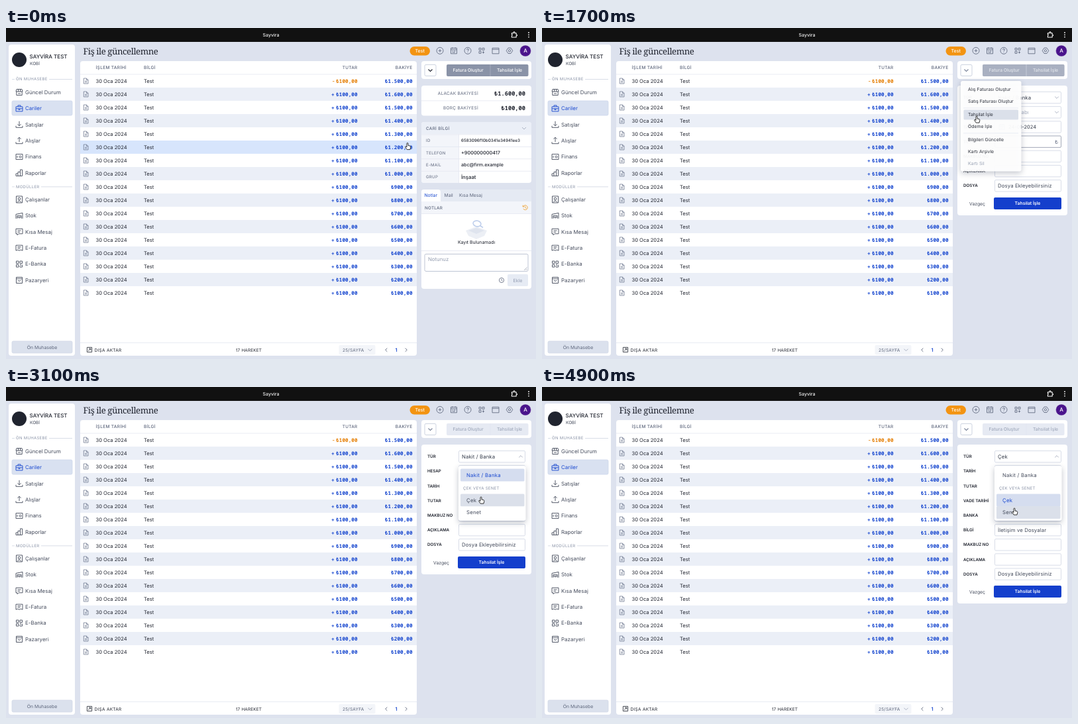
Recreate the animation shown at these times as an HTML page with a canvas. Size 800 by 500 pixels, loop 5000 ms.

```html
<!DOCTYPE html>
<html lang="tr">
<head>
<meta charset="utf-8">
<title>Sayvira</title>
<style>
html, body { margin: 0; width: 100%; height: 100%; overflow: hidden; background: #dde2ee; }
canvas { display: block; width: 800px; height: 500px; }
</style>
</head>
<body>
<canvas id="stage"></canvas>
<script>
const canvas = document.getElementById('stage');
const c = canvas.getContext('2d');
const dpr = window.devicePixelRatio || 1;
canvas.width = 800 * dpr;
canvas.height = 500 * dpr;

const LOOP = 5000, STEP = 100;
const SANS = 'Inter, "Open Sans", sans-serif';
const MONO = '"Noto Sans Mono", "DejaVu Sans Mono", monospace';
const SERIF = '"Noto Serif", serif';
const INK = '#20242f', TEXT = '#434a5b', MUTED = '#a3abbd', BLUE = '#1747cf';
const LINE = '#e3e7f0', PALE = '#ebeff7', TINT = '#f3f5fa', BORDER = '#cfd5e2', SLATE = '#5d667c';

const ICONS = {
  store: 'M-4-4.5H4L5-1H-5ZM-4.2-1V4.5H4.2V-1M-1.5-4.5V-1M1.5-4.5V-1M-2 2H2',
  brief: 'M-5-2.5H5V4.5H-5ZM-2-2.5V-4.5H2V-2.5M-5 .5H5M-1 .5V2H1V.5',
  down: 'M0-5V2M-2.5-.5L0 2L2.5-.5M-5 2V4.5H5V2',
  up: 'M0 2V-5M-2.5-2.5L0-5L2.5-2.5M-5 2V4.5H5V2',
  safe: 'M-5-4H5V4H-5ZM3 0A1.5 1.5 0 1 1 0 0A1.5 1.5 0 1 1 3 0M-3-1.5V1.5',
  bars: 'M-5 4.5V1H-2V4.5M-2 1V-1.5H1.5V4.5M1.5-1.5V-5H4.5V4.5H-5',
  person: 'M-4.5-5H4.5V5H-4.5ZM1.8-1A1.8 1.8 0 1 1-1.8-1A1.8 1.8 0 1 1 1.8-1M-3 4.5Q0-.5 3 4.5',
  shed: 'M-5 4.5V-2L5-4V4.5M-3 4.5V0H3V4.5M-3 2.2H3M0 2.2V4.5',
  chat: 'M-5-4.5H5V3H-1L-3 5V3H-5ZM-2.5-1.8H2.5M-2.5.5H1',
  bill: 'M-5-4H5V4L2.5 3L0 4L-2.5 3L-5 4ZM-2.5-1.5H2.5M-2.5.7H1.5',
  tiles: 'M-4.5-4.5H-1V-1H-4.5ZM1-4.5H4.5V-1H1ZM-4.5 1H-1V4.5H-4.5ZM1 1H2.5V2.5M4.5 1V4.5H1V3',
  market: 'M-4.5-4.5H4.5V4.5H-4.5ZM-4.5-2.2H4.5M-2.2 0Q0 3 2.2 0',
  doc: 'M-3.2-4H1L3.5-1.5V4H-3.2ZM1-4V-1.5H3.5M-1.5.3H1.8M-1.5 2H1.8',
  plus: 'M5 0A5 5 0 1 1-5 0A5 5 0 1 1 5 0M-2.3 0H2.3M0-2.3V2.3',
  date: 'M-4.5-4H4.5V4.5H-4.5ZM-4.5-1.5H4.5M-2.2-5V-3M2.2-5V-3M-2.5.5H-1M0 .5H2.5M-2.5 2.5H2',
  help: 'M5 0A5 5 0 1 1-5 0A5 5 0 1 1 5 0M-1.5-1.2Q-1.3-2.8 0-2.8Q1.6-2.7 1.5-1.3Q1.3-.4 0 .3V1M0 2.3V3',
  apps: 'M-4-4H-1V-1H-4ZM1-4H4V-1H1ZM-4 1H-1V4H-4ZM2.5 .8V4.2M.8 2.5H4.2',
  win: 'M-5-4H5V4.5H-5ZM-5-2H5',
  gear: 'M-2-4.2H2L4.8 0L2 4.2H-2L-4.8 0ZM1.7 0A1.7 1.7 0 1 1-1.7 0A1.7 1.7 0 1 1 1.7 0',
  puzzle: 'M-4-2.5H-1Q-1.5-4.6 0-4.6Q1.5-4.6 1-2.5H3.5V0Q5-.2 5 1Q5 2.2 3.5 2V4.5H-4V2.2Q-2-.2-4-.2Z',
  share: 'M-4-4H4V4H-4ZM-2 2L2-2M-1-2H2V1',
  clock: 'M4 0A4 4 0 1 1-4 0A4 4 0 1 1 4 0M0-2.3V0L1.6 1',
  back: 'M-3.5-1.5A3.6 3.6 0 1 1-3.4 1.6M-4-3.8V-1.3H-1.5M0-1.8V.3L1.5 1.2'
};
const CURSORS = {
  hand: 'M-1 .8Q-1-.5 0-.5Q1-.5 1 .8V3.5L4 4.2Q5 4.6 4.8 6L4 9.6H-.8L-3.4 5.8Q-3.3 4.4-2 5.1L-1 6Z',
  arrow: 'M0 0V9L2.1 7.1L3.6 10.3L5 9.6L3.6 6.5H6.4Z',
  beam: 'M-1.8-4.5Q0-4.5 0-3.5Q0-4.5 1.8-4.5M0-3.5V3.5M-1.8 4.5Q0 4.5 0 3.5Q0 4.5 1.8 4.5'
};

function ramp(t, a, b) { return Math.max(0, Math.min(1, (t - a) / (b - a))); }

function text(s, x, y, size, color = TEXT, o = {}) {
  c.font = `${o.w || 400} ${size}px ${o.f || SANS}`;
  c.letterSpacing = (o.ls || 0) + 'px';
  c.textRendering = 'geometricPrecision';
  c.textAlign = o.a || 'left';
  c.fillStyle = color;
  c.fillText(s, x, y + size * 0.364);
}

function box(x, y, w, h, r, fill, stroke) {
  c.beginPath();
  c.roundRect(x, y, w, h, r);
  if (fill) { c.fillStyle = fill; c.fill(); }
  if (stroke) { c.strokeStyle = stroke; c.lineWidth = 0.8; c.stroke(); }
}

function rect(x, y, w, h, fill) { c.fillStyle = fill; c.fillRect(x, y, w, h); }

function dot(x, y, r, fill) {
  c.beginPath();
  c.arc(x, y, r, 0, 7);
  c.fillStyle = fill;
  c.fill();
}

function at(x, y, paint) { c.save(); c.translate(x, y); paint(); c.restore(); }

function icon(name, x, y, color = SLATE, scale = 1, lw = 0.9) {
  at(x, y, () => {
    c.scale(scale, scale);
    c.strokeStyle = color;
    c.lineWidth = lw;
    c.stroke(new Path2D(ICONS[name]));
  });
}

// turn: 1 points down, -1 up
function chevron(x, y, color, turn = 1, size = 3, lw = 0.9) {
  c.beginPath();
  c.moveTo(x - size, y - size * turn / 2);
  c.lineTo(x, y + size * turn / 2);
  c.lineTo(x + size, y - size * turn / 2);
  c.strokeStyle = color;
  c.lineWidth = lw;
  c.stroke();
}

function fade(alpha, paint) {
  if (alpha <= 0) return;
  c.save();
  c.globalAlpha *= alpha;
  paint();
  c.restore();
}

function popup(x, y, w, h) {
  c.save();
  c.shadowColor = 'rgba(30,40,70,.28)';
  c.shadowBlur = 9 * dpr;
  c.shadowOffsetY = 3 * dpr;
  box(x, y, w, h, 3, '#fff');
  c.restore();
}

function money(n) {
  const s = n < 1000 ? n : Math.floor(n / 1000) + '.' + String(n % 1000).padStart(3, '0');
  return '₺' + s + ',00';
}

const PATH = [
  [0, 606, 174], [100, 606, 174], [450, 643, 62], [700, 643, 62], [1150, 656, 133.5],
  [1750, 656, 133.5], [2150, 732, 107.5], [2600, 732, 107.5], [3050, 717, 166.5],
  [3850, 717, 166.5], [4250, 729, 107.5], [4500, 729, 107.5], [4850, 713, 183.5], [5000, 713, 183.5]
];

function pointer(t) {
  const i = PATH.findIndex((k, n) => n && t <= k[0]);
  const [t0, x0, y0] = PATH[i - 1], [t1, x1, y1] = PATH[i];
  const u = ramp(t, t0, t1), e = u * u * (3 - 2 * u);
  const x = x0 + (x1 - x0) * e, y = y0 + (y1 - y0) * e;
  let kind = 'hand';
  if (t < 600 && x >= 620 && y > 75 || t > 700 && t < 1150 && y > 74 && y < 83) kind = 'arrow';
  if (t > 1850 && t < 2100) kind = 'arrow';
  if (t >= 3300 && t < 4300 && y > 116) kind = 'beam';
  return { x, y, kind };
}

function topBar() {
  rect(0, 0, 800, 21, '#111');
  text('Sayvira', 400, 10.5, 7, '#f4f4f4', { w: 500, a: 'center' });
  icon('puzzle', 767, 10, '#fff', 0.9, 1.2);
  for (const y of [7, 10.3, 13.6]) dot(789, y, 0.9, '#fff');
}

function heading(s, y, x) {
  rect(9, y, 4, 0.8, BORDER);
  rect(x, y, 100 - x, 0.8, BORDER);
  text(s, 15, y, 6, '#8b94a8', { ls: 0.3 });
}

function sidebar() {
  box(4, 25, 100, 470, 4, '#fff');
  dot(20, 48, 11, '#20242f');
  text('SAYVİRA TEST', 35.5, 43.5, 8, INK, { w: 500 });
  text('KOBİ', 36, 53.5, 6.5, TEXT);
  heading('ÖN MUHASEBE', 77, 65);
  heading('MODÜLLER', 239.5, 53);
  box(9, 110, 91, 22, 2, '#d9e1f1', '#cdd7eb');
  const groups = [
    [97, 'store', 'Güncel Durum', 'brief', 'Cariler', 'down', 'Satışlar', 'up', 'Alışlar', 'safe', 'Finans', 'bars', 'Raporlar'],
    [259, 'person', 'Çalışanlar', 'shed', 'Stok', 'chat', 'Kısa Mesaj', 'bill', 'E-Fatura', 'tiles', 'E-Banka', 'market', 'Pazaryeri']
  ];
  for (const [y0, ...items] of groups) {
    for (let i = 0; i < 6; i++) {
      const y = y0 + i * 24.4, label = items[2 * i + 1];
      const color = label === 'Cariler' ? BLUE : TEXT;
      icon(items[2 * i], 20, y, color);
      text(label, 29, y, 7.9, color, { ls: 0.05 });
    }
  }
  box(9, 473, 91, 18, 2, '#dbe1ed', '#d2d9e7');
  text('Ön Muhasebe', 54.5, 482, 6.9, SLATE, { a: 'center' });
}

function header() {
  text('Fiş ile güncellemne', 116.5, 34.8, 13.2, INK, { f: SERIF, ls: -0.42 });
  box(609.5, 28, 30.5, 13.5, 6.8, '#f39412');
  text('Test', 624.7, 34.7, 7, '#fff', { w: 500, a: 'center' });
  ['plus', 'date', 'help', 'apps', 'win', 'gear'].forEach((n, i) => icon(n, 655 + i * 21, 34.3, SLATE, 1, 0.85));
  dot(784, 34.5, 8.6, '#a58fc4');
  dot(784, 34.5, 8, '#4a148c');
  text('A', 784, 34.5, 8, '#fff', { w: 500, a: 'center' });
}

function table(hover) {
  box(112, 50, 508, 445, 4, '#fff');
  const cap = { ls: 0.3, w: 500 }, right = { ls: 0.3, w: 500, a: 'right' };
  text('İŞLEM TARİHİ', 135.5, 60, 6.6, SLATE, cap);
  text('BİLGİ', 208, 60, 6.6, SLATE, cap);
  text('TUTAR', 530.5, 60, 6.4, SLATE, right);
  text('BAKİYE', 613.5, 60, 6.6, SLATE, right);
  rect(112, 69.6, 508, 0.8, LINE);
  const num = { f: MONO, w: 600, a: 'right' };
  for (let i = 0; i < 17; i++) {
    const y = 80 + i * 20, color = i ? BLUE : '#e57f06';
    if (i === hover) rect(112, y - 10, 508, 20, '#d7e5fc');
    else if (i % 2) rect(112, y - 10, 508, 20, PALE);
    icon('doc', 120.5, y, '#737c92', 1, 0.8);
    text('30 Oca 2024', 135.5, y, 7.6, INK);
    text('Test', 208, y, 7.6, INK);
    text(i ? '+' : '-', 496, y, 7.7, color, { w: 600, a: 'right' });
    text(money(100), 530.5, y, 7.7, color, num);
    text(money(i ? 1700 - i * 100 : 1500), 613.5, y, 7.7, BLUE, num);
  }
  rect(112, 475, 508, 0.8, LINE);
  icon('share', 126, 486, INK, 0.9);
  text('DIŞA AKTAR', 133.5, 486.3, 6.5, INK, { ls: 0.3 });
  text('17 HAREKET', 366.5, 486.3, 6.4, INK, { ls: 0.2, a: 'center' });
  box(502.5, 479, 55, 14.5, 2, '#f3f5f9');
  text('25/SAYFA', 508, 486.3, 6.6, SLATE, { ls: 0.2 });
  chevron(549.5, 486.3, MUTED);
  text('1', 589, 486.3, 7.4, BLUE, { w: 600, a: 'center' });
  for (const side of [-1, 1]) at(589 + side * 15, 486.3, () => {
    c.rotate(-side * Math.PI / 2);
    chevron(0, 0, SLATE, 1, 2.6);
  });
}

function actions(t) {
  const off = ramp(t, 1600, 1900);
  const turn = 1 - 2 * (ramp(t, 500, 700) - ramp(t, 1500, 1680));
  box(627, 50, 166, 27, 4, '#fff');
  box(632, 55.4, 17, 17, 2, '#fff', '#bfc7d8');
  chevron(640.5, 64, off ? '#7b859b' : INK, turn, 3, 1.1);
  const pair = (bg, fg, split) => {
    box(665, 55, 123.5, 18, 2, bg);
    rect(730.6, 55, 0.8, 18, split);
    text('Fatura Oluştur', 697.5, 64, 6.8, fg, { w: 500, a: 'center' });
    text('Tahsilat İşle', 760, 64, 6.8, fg, { w: 500, a: 'center' });
  };
  if (off < 1) pair('#8a93a7', '#fff', '#a8b0c0');
  fade(off, () => pair('#e6eaf3', '#9fa8bb', '#e1e6f0'));
}

function details() {
  box(627, 87, 166, 45.5, 4, '#fff');
  rect(627, 109.5, 166, 0.8, LINE);
  [['ALACAK BAKİYESİ', 1600, 98.5], ['BORÇ BAKİYESİ', 100, 121]].forEach(([s, n, y]) => {
    text(s, 713, y, 6.5, SLATE, { a: 'right', ls: 0.3 });
    text(money(n), 784, y, 8.7, INK, { f: MONO, w: 600, a: 'right' });
  });

  box(627, 142, 166, 92, 4, '#fff');
  box(627, 142, 166, 18.5, [4, 4, 0, 0], PALE);
  box(627, 160.5, 56, 73.5, [0, 0, 0, 4], TINT);
  text('CARİ BİLGİ', 634, 151.5, 6.4, SLATE, { ls: 0.3, w: 500 });
  chevron(782, 151.5, MUTED);
  rect(683, 160.5, 0.8, 73.5, LINE);
  const rows = [
    ['ID', '6583096f10b0341e34941ee3', 6.3], ['TELEFON', '+900000000417', 7.3],
    ['E-MAİL', 'abc@firm.example', 7.1], ['GRUP', 'İnşaat', 7.8]
  ];
  rows.forEach(([k, v, size], i) => {
    const y = 170 + i * 18.4;
    rect(627, y - 9.4, 166, 0.8, LINE);
    text(k, 634, y, 6.1, SLATE, { ls: 0.3 });
    text(v, 687, y, size, INK, { w: 500 });
  });

  box(627, 244, 166, 150, 4, '#fff');
  box(627, 244, 166, 18, [4, 4, 0, 0], '#e5eaf3');
  box(627, 244, 29, 18, [4, 4, 0, 0], '#fff');
  text('Notlar', 631.5, 253, 6.8, BLUE);
  text('Mail', 661.5, 253, 6.8, SLATE);
  text('Kısa Mesaj', 684, 253, 6.8, SLATE);
  rect(627, 262, 166, 18, TINT);
  rect(627, 280, 166, 0.8, LINE);
  text('NOTLAR', 632, 271.3, 6.3, SLATE, { ls: 0.25, w: 500 });
  icon('back', 784, 271.3, '#f0a53a', 0.95, 1);
  c.fillStyle = '#eceff5';
  c.fill(new Path2D('M694 306L710 300L726 306L722 314L710 319L698 314Z'));
  c.fillStyle = '#dfe4ee';
  c.fill(new Path2D('M698 306L710 302L722 306L710 311Z'));
  c.strokeStyle = '#bfcfec';
  c.lineWidth = 1.6;
  c.beginPath();
  c.ellipse(711, 295.5, 6, 4.3, 0.2, 0, 7);
  c.moveTo(715.5, 298.5);
  c.lineTo(720, 301.5);
  c.stroke();
  text('Kayıt Bulunamadı', 710, 323, 6.9, INK, { a: 'center' });
  rect(627, 336, 166, 0.8, LINE);
  box(632, 341.5, 156, 26, 2, '#fff', '#aeb7ca');
  text('Notunuz', 637, 349.5, 7.8, '#949db0');
  c.strokeStyle = '#7f889c';
  c.lineWidth = 0.6;
  c.stroke(new Path2D('M786.5 361.5L782 366M786.5 364L784.5 366'));
  icon('clock', 748, 381, SLATE, 0.9);
  box(757, 372, 31, 18, 2, '#e6ebf4');
  text('Ekle', 772.5, 381, 7, '#929bb0', { a: 'center' });
}

const FORMS = {
  cash: [
    ['TÜR', 'select', 'Nakit / Banka'], ['HESAP', 'select', 'Kasa Hesabı'], ['TARİH', 'date'], ['TUTAR', 'sum'],
    ['MAKBUZ NO'], ['AÇIKLAMA'], ['DOSYA', 'text', 'Dosya Ekleyebilirsiniz']
  ],
  cheque: [
    ['TÜR', 'select', 'Çek'], ['TARİH', 'date'], ['TUTAR', 'sum'], ['VADE TARİHİ', 'date'],
    ['BANKA', 'select', 'Banka Seçiniz'], ['BİLGİ', 'text', 'İletişim ve Dosyalar'],
    ['MAKBUZ NO'], ['AÇIKLAMA'], ['DOSYA', 'text', 'Dosya Ekleyebilirsiniz']
  ]
};

function form(t, p, open) {
  const rows = t < 3300 ? FORMS.cash : FORMS.cheque;
  const end = Math.round(109.6 + rows.length * 22.2);
  box(627, 87, 166, end + 18 - 87, 4, '#fff');
  rows.forEach(([label, type, value], i) => {
    const y = 105 + i * 22.2;
    const hover = p.x > 683 && Math.abs(p.y - y) < 9 && open === 0;
    let edge = hover ? (type === 'date' ? '#4b5368' : '#8f9dbd') : BORDER;
    if (type === 'sum') edge = t < 1800 ? '#8c94a6' : '#f0625c';
    if (i === 0 && t >= 3300 && t < 4300) edge = '#4a80e6';
    text(label, 636, y, 6.2, INK, { w: 600 });
    box(683.5, y - 8.6, 100, 17.4, 1.5, '#fff', edge);
    if (value) {
      const dim = label === 'BANKA' || label === 'HESAP' && t < 1800;
      text(value, 688, y, 7.75, dim ? MUTED : type === 'select' ? '#333a49' : TEXT, { ls: 0.12 });
    }
    if (type === 'select') chevron(777, y, MUTED, i ? 1 : 1 - 2 * open, 2.8);
    if (type === 'date') {
      icon('date', 694, y, '#7b8499', 0.9, 0.8);
      text('24-01-2024', 704, y, 7.45, '#333a49');
    }
    if (type === 'sum') text('₺', 779, y, 8, SLATE, { a: 'right', f: MONO });
  });
  text('Vazgeç', 657, end + 0.4, 6.8, TEXT, { a: 'center' });
  box(682, end - 9, 102, 18, 2, '#143fcc');
  text('Tahsilat İşle', 733, end, 6.8, '#fff', { w: 600, a: 'center' });
}

function menu(p) {
  popup(632, 80, 91.5, 136.5);
  const items = [
    [92.5, 'Alış Faturası Oluştur'], [110.3, 'Satış Faturası Oluştur'], [131, 'Tahsilat İşle'],
    [148.7, 'Ödeme İşle'], [169, 'Bilgileri Güncelle'], [187, 'Kartı Arşivle'], [204.7, 'Kartı Sil']
  ];
  rect(636, 120.5, 83, 0.8, LINE);
  rect(636, 158.5, 83, 0.8, LINE);
  for (const [y, s] of items) {
    if (Math.abs(p.y - y) < 8) box(636.5, y - 7.6, 82.5, 15, 1.5, '#dadfe9');
    text(s, 643, y, 6.85, s === 'Kartı Sil' ? '#949db0' : INK);
  }
}

function options(p, chosen) {
  popup(683, 119, 101.5, 83);
  for (const [y, s] of [[133, 'Nakit / Banka'], [170.8, 'Çek'], [189.5, 'Senet']]) {
    const on = s === chosen;
    if (on || Math.abs(p.y - y) < 9) box(686, y - 9.4, 96.5, 18.8, 1.5, on ? '#d5ddef' : '#dbe0ea');
    text(s, 695, y, 7.75, on ? BLUE : TEXT, { ls: 0.25 });
  }
  text('ÇEK VEYA SENET', 690, 153, 6.1, '#8b94a8', { ls: 0.25 });
}

function cursor({ x, y, kind }) {
  const shape = new Path2D(CURSORS[kind]);
  at(x, y, () => {
    c.lineJoin = 'round';
    if (kind === 'beam') {
      c.strokeStyle = '#fff';
      c.lineWidth = 1.8;
      c.stroke(shape);
    } else {
      c.fillStyle = kind === 'hand' ? '#fff' : '#000';
      c.fill(shape);
    }
    c.strokeStyle = kind === 'arrow' ? '#fff' : '#111';
    c.lineWidth = 0.85;
    c.stroke(shape);
  });
}

function draw(t) {
  const p = pointer(t);
  const first = ramp(t, 2600, 2800) - ramp(t, 3250, 3450);
  const second = ramp(t, 4400, 4600);
  c.setTransform(dpr, 0, 0, dpr, 0, 0);
  rect(0, 0, 800, 500, '#dde2ee');
  topBar();
  sidebar();
  header();
  table(t < 600 && p.x < 620 ? Math.floor((p.y + 4 - 70) / 20) : -1);
  actions(t);
  if (t < 1600) details();
  else form(t, p, Math.max(first, second));
  fade(ramp(t, 500, 720) - ramp(t, 1690, 1890), () => menu(p));
  fade(first, () => options(p, t < 3300 ? 'Nakit / Banka' : 'Çek'));
  fade(second, () => options(p, 'Çek'));
  cursor(p);
}

// Time advances in whole steps, like a screen recording
const start = performance.now();
function tick() {
  const t = (performance.now() - start) % LOOP;
  draw(Math.floor(t / STEP) * STEP);
  requestAnimationFrame(tick);
}
tick();
</script>
</body>
</html>
```
